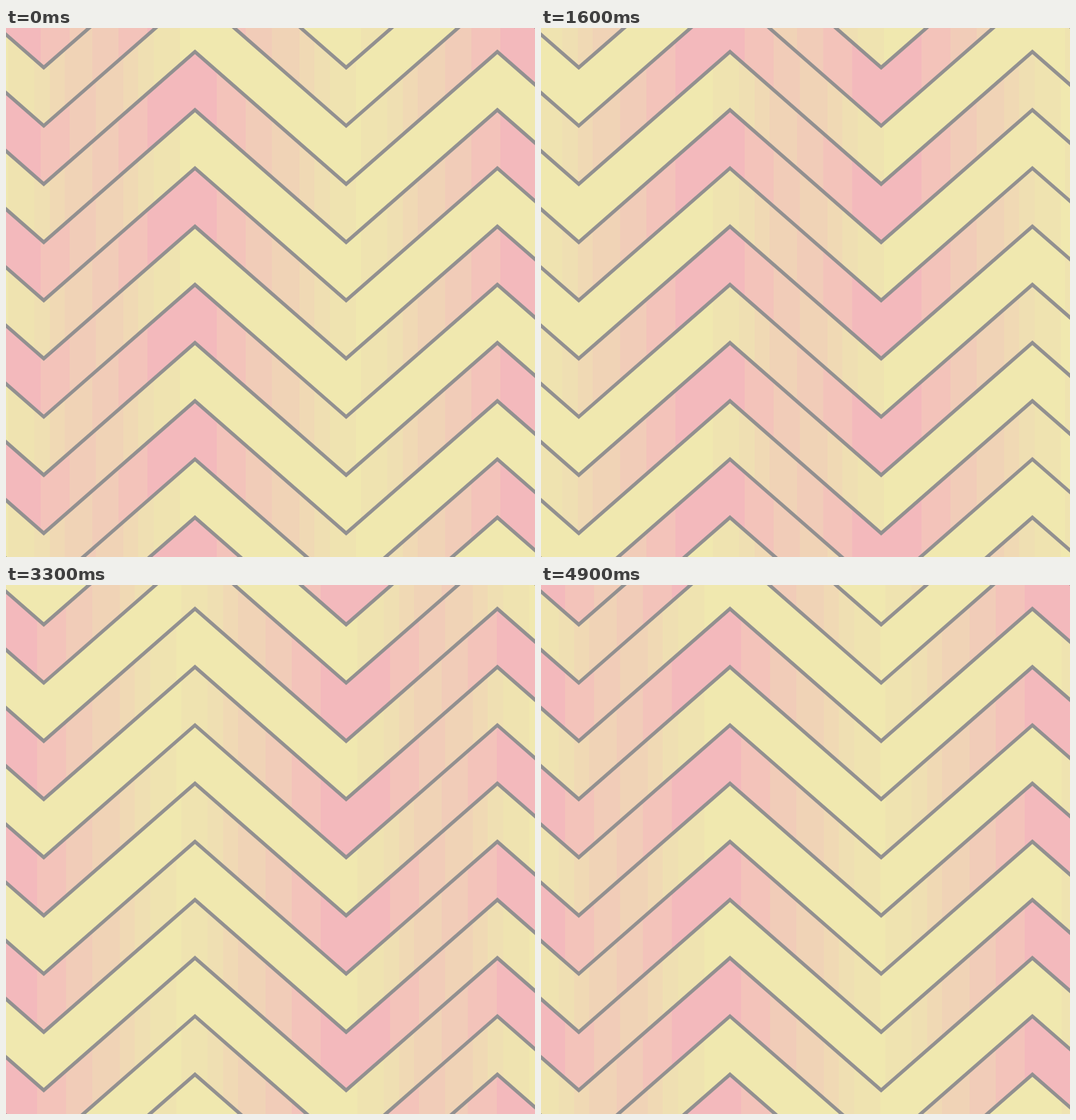
Write an HTML page with a canvas that moves like this. It is 748 by 748 pixels and loops after 5 s.

```html
<!DOCTYPE html>
<html lang="en">
<head>
<meta charset="utf-8">
<title>Chevron colour drift</title>
<style>
  html, body { margin: 0; height: 100%; overflow: hidden; background: #f0e8af; }
  canvas { display: block; }
</style>
</head>
<body>
<canvas id="stage" width="748" height="748"></canvas>
<script>
const SIZE = 748, LOOP = 5000, TICK = 100;
const LOW_X = 53.4, HALF_WAVE = 213.8, RISE = 187, FIRST_LOW = 56, SPACING = 82.3, LINES = 12;
const YELLOW = '#f0e8af';
// Half-width and colour of each step of the glow, widest first
const GLOW = [
  [246, '#efe3b0'], [209, '#efdfb2'], [187, '#f0d9b4'], [166, '#f0d3b6'],
  [127, '#f1ccb8'], [90, '#f3c3ba'], [49, '#f3b9bc']
];

const ctx = document.getElementById('stage').getContext('2d');

function zigzag(k) {
  const points = [];
  for (let i = -1; i <= 4; i++) {
    points.push([LOW_X + i * HALF_WAVE, FIRST_LOW + k * SPACING - (i % 2 ? RISE : 0)]);
  }
  return points;
}

function addPath(path, points) {
  points.forEach(([x, y], i) => i ? path.lineTo(x, y) : path.moveTo(x, y));
}

const lines = new Path2D(), bands = new Path2D();
for (let k = 0; k < LINES; k++) {
  addPath(lines, zigzag(k));
  if (k % 2 === 0) {
    addPath(bands, [...zigzag(k), ...zigzag(k + 1).reverse()]);
    bands.closePath();
  }
}

function paintGlow(phase) {
  const center = Math.round(phase % 1 * SIZE);
  ctx.fillStyle = YELLOW;
  ctx.fillRect(0, 0, SIZE, SIZE);
  for (const [half, color] of GLOW) {
    ctx.fillStyle = color;
    for (const x of [center - SIZE, center, center + SIZE]) {
      ctx.fillRect(x - half, 0, 2 * half, SIZE);
    }
  }
}

function draw(now) {
  const phase = Math.floor(now % LOOP / TICK) * TICK / LOOP;
  paintGlow(phase);
  ctx.save();
  ctx.clip(bands);
  paintGlow(phase + 1 / 3);
  ctx.restore();
  ctx.strokeStyle = '#929090';
  ctx.lineWidth = 5;
  ctx.stroke(lines);
}

const start = performance.now();
function frame() {
  draw(performance.now() - start);
  requestAnimationFrame(frame);
}
frame();
</script>
</body>
</html>
```
